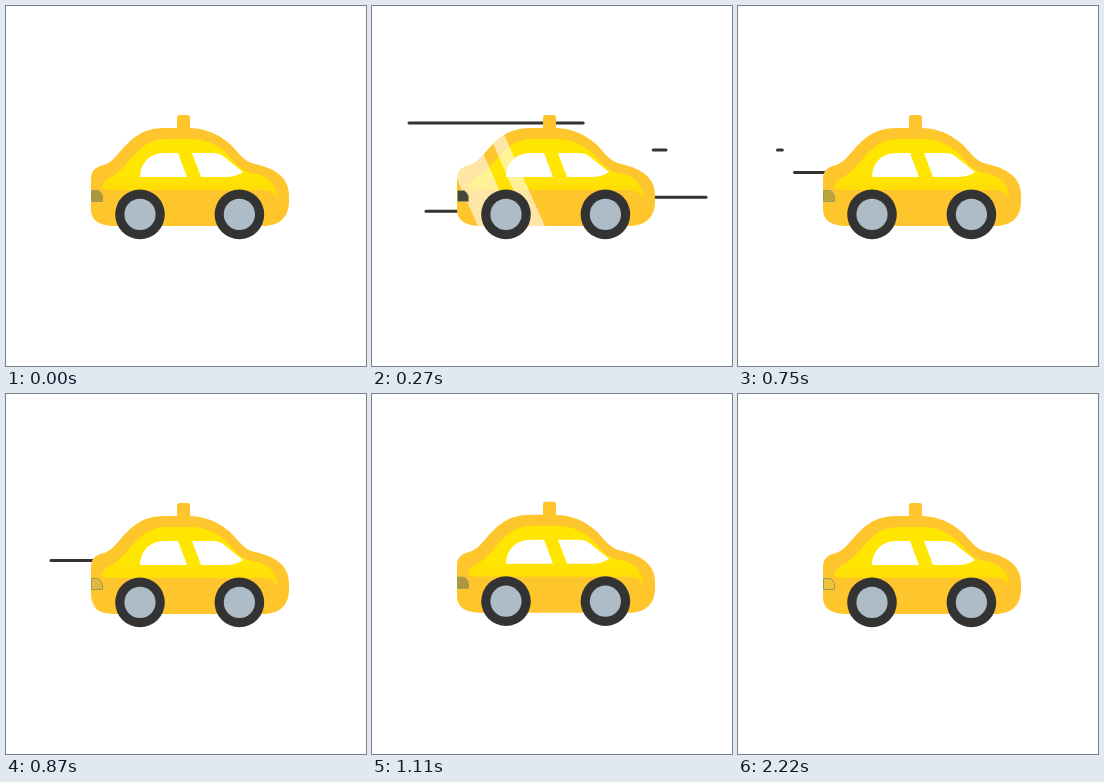
An HTML page that plays this animation: 360x360 px, repeating every 2.25 s.

```html
<!DOCTYPE html>
<html lang="en">
<head>
<meta charset="utf-8">
<title>Taxi</title>
<style>
html, body { margin: 0; width: 100%; height: 100%; overflow: hidden; background: #fff; }
svg { display: block; width: 100vw; height: 100vh; }
</style>
</head>
<body>
<svg viewBox="0 0 360 360">
  <defs>
    <path id="body" d="M85 173C85 164 90 161 98 159C107 156 112 147 121 138C133 126 143 122 160 122H181C200 122 212 128 224 138C233 147 237 155 249 158C267 162 283 170 283 189V195C283 211 274 220 257 220H110C94 220 85 215 85 203Z"/>
    <clipPath id="clip"><use href="#body"/></clipPath>
    <linearGradient id="paint" gradientUnits="userSpaceOnUse" x1="0" y1="168" x2="0" y2="185">
      <stop stop-color="#ffe600"/><stop offset="1" stop-color="#ffdc08"/>
    </linearGradient>
  </defs>
  <g id="lines" stroke="#333" stroke-width="3" stroke-linecap="round"></g>
  <g id="car">
    <rect x="171" y="109" width="13" height="17" rx="2.5" fill="#ffc52c"/>
    <use href="#body" fill="#ffc52c"/>
    <path fill="url(#paint)" d="M96 180C98 174 104 172 110 168C119 161 125 152 132 145C142 136 149 133 162 133H184C200 133 211 139 220 147C229 156 234 165 246 167C261 169 271 178 271 190V193C269 187 264 184 256 184H106C100 184 96 184 96 180Z"/>
    <g clip-path="url(#clip)">
      <g id="shine" fill="#fff" fill-opacity=".58">
        <path d="M138 116L153 116L202 226L186 226Z"/>
        <path d="M86 116L124 116L172 226L135 226Z"/>
      </g>
    </g>
    <g fill="#fff">
      <path d="M134 171C134 160 141 147 159 147H172L181 171Z"/>
      <path d="M186 147H207Q213 147 217 150L237 166Q230 171 220 171H195Z"/>
    </g>
    <path id="lamp" d="M85.5 184.5H92Q96.5 187 96.5 192V195.5H85.5Z" stroke="#a09a50" stroke-width="1"/>
    <g id="wheels"></g>
  </g>
</svg>
<script>
const LOOP = 2250;
const $ = id => document.getElementById(id);

function add(parent, tag, attrs) {
  const el = document.createElementNS("http://www.w3.org/2000/svg", tag);
  for (const key in attrs) el.setAttribute(key, attrs[key]);
  return parent.appendChild(el);
}

for (const cx of [134, 233.4]) {
  add($("wheels"), "circle", { cx, cy: 208.4, r: 24.8, fill: "#333" });
  add($("wheels"), "circle", { cx, cy: 208.4, r: 15.6, fill: "#adbcc6" });
}

// Each streak runs from right to left: head and tail have their own time spans.
const streaks = [
  { y: 117, from: 290, to: 37, head: [30, 240], tail: [190, 450] },
  { y: 144, from: 294, to: 39.5, head: [256, 554], tail: [440, 757] },
  { y: 191.2, from: 334, to: 26, head: [150, 390], tail: [300, 600] },
  { y: 205.2, from: 276, to: 54, head: [30, 240], tail: [200, 440] },
  { y: 166.4, from: 270, to: 45, head: [510, 764], tail: [690, 970] }
];
for (const s of streaks) s.el = add($("lines"), "line", { y1: s.y, y2: s.y });

const sweeps = [193, 860];
const SWEEP = 250;

// time, lamp colour, lamp opacity
const lampKeys = [
  [0, [165, 152, 62], 0.95],
  [270, [72, 70, 56], 1],
  [750, [176, 160, 62], 0.85],
  [960, [225, 195, 80], 0.5],
  [1110, [165, 152, 62], 0.95],
  [1710, [215, 185, 65], 0.6],
  [2220, [225, 195, 65], 0.55],
  [2250, [165, 152, 62], 0.95]
];

const part = (t, [a, b]) => Math.min(1, Math.max(0, (t - a) / (b - a)));
const mix = (a, b, p) => a + (b - a) * p;

function drawStreak(s, t) {
  const head = part(t, s.head), tail = part(t, s.tail);
  const x1 = mix(s.from, s.to, head), x2 = mix(s.from, s.to, tail);
  s.el.setAttribute("x1", x1);
  s.el.setAttribute("x2", x2);
  s.el.setAttribute("visibility", x2 - x1 > 0.1 ? "visible" : "hidden");
}

function drawLamp(t) {
  const i = lampKeys.findIndex((k, n) => n && t < k[0]);
  const [t0, c0, o0] = lampKeys[i - 1], [t1, c1, o1] = lampKeys[i];
  const p = part(t, [t0, t1]);
  const rgb = c0.map((c, n) => Math.round(mix(c, c1[n], p)));
  $("lamp").setAttribute("fill", `rgb(${rgb})`);
  $("lamp").setAttribute("fill-opacity", mix(o0, o1, p));
}

function draw(t) {
  for (const s of streaks) drawStreak(s, t);
  const start = sweeps.find(s => t >= s && t < s + SWEEP);
  const on = start !== undefined;
  $("shine").setAttribute("visibility", on ? "visible" : "hidden");
  if (on) $("shine").setAttribute("transform", `translate(${mix(-120, 180, (t - start) / SWEEP)} 0)`);
  const lift = 1.3 * Math.sin(Math.PI * part(t, [980, 1200]));
  $("car").setAttribute("transform", `translate(0 ${-lift})`);
  drawLamp(t);
}

const begin = performance.now();
function tick() {
  draw((performance.now() - begin) % LOOP);
  requestAnimationFrame(tick);
}
tick();
</script>
</body>
</html>
```
